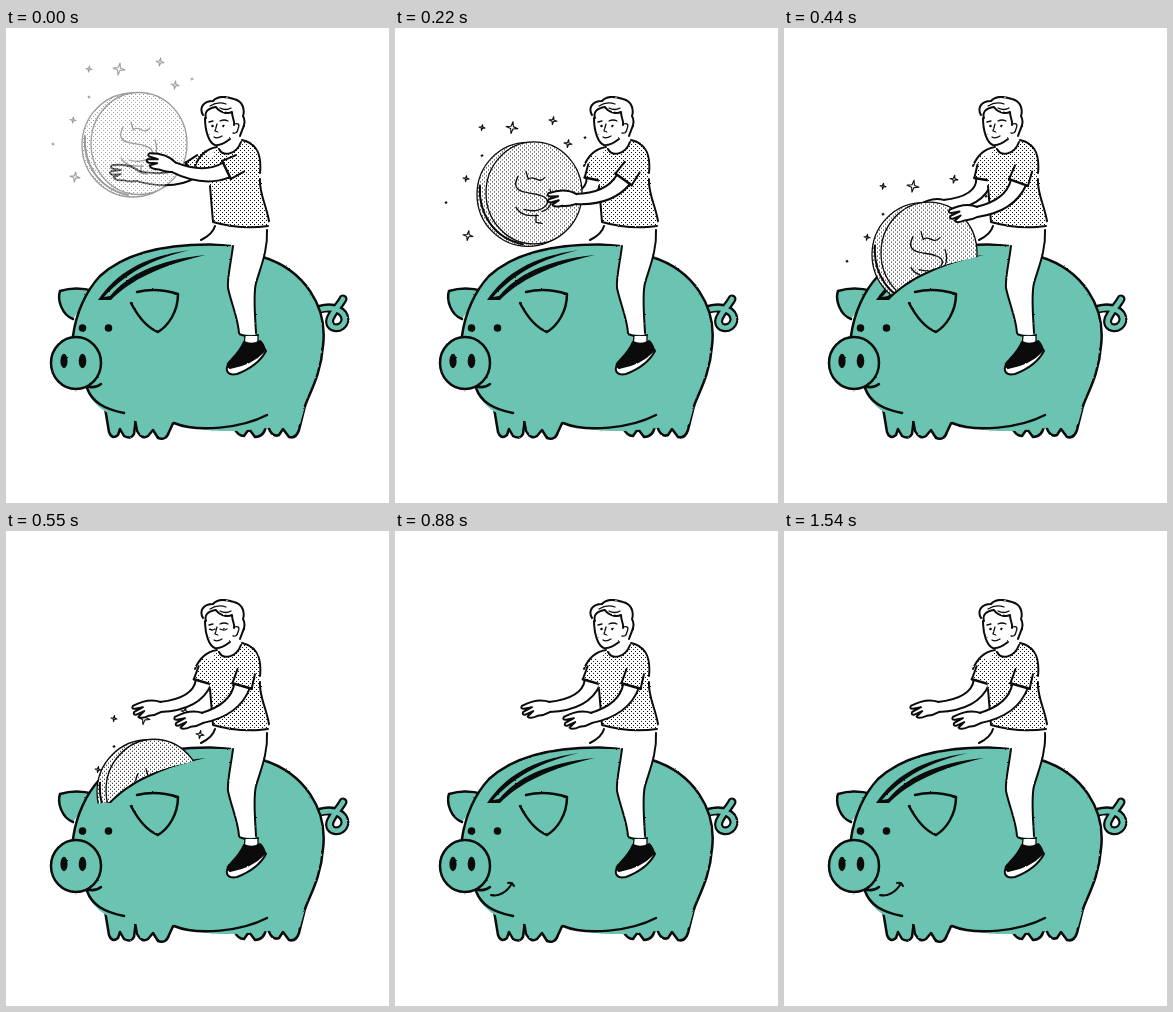
Write an HTML page that moves like this. It is 383 px wide and 475 px high and loops after 1.65 s.

```html
<!DOCTYPE html>
<html lang="en">
<head>
<meta charset="utf-8">
<title>Piggy bank</title>
<style>
  html, body { margin: 0; width: 100%; height: 100%; overflow: hidden; background: #fff; }
  svg { display: block; width: 100%; height: 100%; }
  .ink { fill: none; stroke: #0b0b0b; stroke-width: 2; stroke-linecap: round; stroke-linejoin: round; }
  .bold { stroke-width: 2.5; }
  .thin { stroke-width: 1.3; }
  .green { fill: #6bc4b1; }
  .white { fill: #fff; }
  .black { fill: #0b0b0b; }
  .dots { fill: url(#dots); }
  .plain { stroke: none; }
</style>
</head>
<body>
<svg viewBox="0 0 383 475">
  <defs>
    <pattern id="dots" width="4" height="4" patternUnits="userSpaceOnUse">
      <path class="white" d="M0 0H4V4H0Z"/>
      <path class="black" d="M0 0h1v1h-1zM2 2h1v1h-1z"/>
    </pattern>
    <clipPath id="aboveSlot">
      <path d="M0 0H383V228H200C145 237 122 252 103 271L90 273H0Z"/>
    </clipPath>
    <filter id="rough" filterUnits="userSpaceOnUse" x="0" y="0" width="383" height="475" color-interpolation-filters="sRGB">
      <feTurbulence type="fractalNoise" baseFrequency=".35" numOctaves="1" seed="4"/>
      <feDisplacementMap in="SourceGraphic" scale="2" xChannelSelector="R" yChannelSelector="G"/>
    </filter>
  </defs>

  <g id="sparkles" class="ink white"></g>

  <g class="ink bold" filter="url(#rough)">
    <path stroke-width="9" d="M314 281C328 277 339 283 339 292C337 303 321 302 324 291C327 283 334 277 337 271"/>
    <path stroke="#6bc4b1" stroke-width="4.6" d="M312 282C328 277 339 283 339 292C337 303 321 302 324 291C327 283 334 277 337 271"/>
    <g class="green">
      <path d="M88 263Q70 258 54 263C51 272 56 287 67 291"/>
      <path d="M99 380L103 404Q106 412 112 407L114 401L118 408Q125 412 128 406L130 390"/>
      <path d="M128 386L131 403Q136 412 142 408L147 402L152 410Q160 413 163 404L169 391"/>
      <path d="M228 400Q232 408 238 408L243 401L249 409Q258 409 260 398"/>
      <path d="M261 386C260 400 266 410 273 407L277 401L283 409Q290 411 293 402L299 378"/>
      <path class="plain" d="M67 308C70 285 80 263 94 248C122 222 168 214 224 217L257 229C298 242 322 278 317 318C315 346 304 364 299 378L294 396L262 400L229 403Q190 404 166 394L129 393L100 384C89 377 82 368 81 358Z"/>
    </g>
    <path d="M67 308C70 285 80 263 94 248C122 222 168 214 224 217M257 229C298 242 322 278 317 318C315 346 304 364 299 378M168 395C192 405 236 400 261 387M81 360C86 374 98 381 118 385"/>
    <path class="green" d="M131 264Q150 259 172 266C172 284 162 298 152 304Q137 298 125 275"/>
    <path d="M80 358Q89 361 95 356"/>
    <ellipse class="green" cx="70" cy="335" rx="25" ry="26"/>
    <g class="black plain">
      <ellipse cx="58" cy="333" rx="3.6" ry="7.2"/><ellipse cx="76.5" cy="333" rx="3.8" ry="7.2"/>
      <circle cx="76.5" cy="300" r="3.8"/><circle cx="102.5" cy="300" r="3.8"/>
      <path d="M92 272C110 246 135 229 184 222C145 231 119 246 98 269L104 268C122 247 150 232 200 227C153 238 125 252 105 272Z"/>
    </g>
    <path id="smile" stroke-width="2" d="M96 364C102 366 112 362 117 352M113 352Q117 351 119 355"/>
  </g>

  <path class="white" d="M195 214Q207 207 210 195L236 198L227 217Z"/>
  <g id="farArm" class="ink"></g>

  <g clip-path="url(#aboveSlot)">
    <g id="coin" class="ink thin">
      <ellipse class="dots" cx="-4" cy="1" rx="51" ry="52"/>
      <path d="M-52 -8C-54 20 -38 45 -9 51" stroke-width="2"/>
      <ellipse class="dots" cx="2" cy="-.5" rx="48" ry="51"/>
      <path d="M-14 -17C-24 2 0 -2 8 2C24 6 12 22 -8 16M-6 -22L-4 -15M-4 -14C2 -20 6 -8 13 -16M-16 14C-10 24 0 22 6 22M4 22V29L10 30M18 -4C22 8 18 16 10 18"/>
    </g>
  </g>

  <path class="dots" d="M213 119C205 124 203 140 204 160L207 194Q235 202 263 197C258 175 252 165 254 145C256 125 250 115 236 112C233 125 222 129 213 119Z"/>

  <g class="ink" filter="url(#rough)">
    <path class="white plain" d="M227 217C225 235 221 250 222 260C226 278 232 290 233 306L250 307C249 285 247 267 250 255C255 238 262 222 261 199Q240 202 212 197Z"/>
    <path d="M195 212Q207 206 209 198M227 218C225 235 221 250 222 260C226 278 232 290 233 305M261 202C262 222 255 238 250 255C247 267 249 285 250 305M233 306Q242 310 252 307"/>
    <path class="white thin" d="M239 308L238 318L252 318V308"/>
    <path class="white" d="M223 334C218 343 222 348 231 346Q252 338 260 323L255 314Z"/>
    <path class="black" d="M238 314Q246 318 254 313Q259 318 258 323Q246 336 224 340Q220 338 226 331Q234 323 238 314Z"/>

    <path class="white plain" d="M213 116L214 123Q224 130 234 118L232 105Z"/>
    <path d="M204 158L207 194Q235 202 262 198M236 112C250 115 256 125 254 145M254 151C253 165 260 176 263 193M211 119C199 121 193 128 189 138M213 121C217 129 230 127 235 114"/>

    <path class="white plain" d="M197 88C199 102 202 114 208 117Q216 118 227 109L237 96C241 80 229 68 211 70C197 72 194 80 197 88Z"/>
    <path d="M199 90C199 103 203 115 209 117Q215 118 224 111M197 87C193 80 197 73 207 73C212 67 222 69 228 71C237 73 239 82 237 88C241 95 236 101 234 108M200 90C198 84 202 80 210 79C214 85 222 86 226 84C226 90 229 93 228 97"/>
    <path class="thin" d="M228 96Q235 94 232 101Q231 106 227 105M203 94L207 93M214 93Q218 91 222 93M211 96L209 103L212 104M208 109Q211 111 216 108M204 78Q212 73 220 76M214 80Q220 83 225 80"/>
    <g id="eyesOpen" class="black plain"><circle cx="206.5" cy="98" r="1.3"/><circle cx="217.5" cy="98" r="1.3"/></g>
    <path id="eyesShut" class="thin" d="M204 98Q206 100 209 98M214 98Q218 100 221 98"/>
  </g>
  <g id="nearArm" class="ink"></g>
</svg>

<script>
const $ = id => document.getElementById(id);
const STEP = 110, LOOP = 1650, HOLD_STEP = 8, HOLD_END = 1430;

const arms = {
  farArm: { shoulder: [204, 129], upper: 46, fore: 37 },
  nearArm: { shoulder: [243, 131], upper: 50, fore: 34 }
};

// Wrist x, y and hand tilt in degrees, at key steps
const lift = { farArm: [131, 148, 17], nearArm: [167, 139, 24] };
const hold = { farArm: [158, 172, 10], nearArm: [180, 171, 6] };
const lower = { farArm: [165, 178, -15], nearArm: [189, 181, 0] };
const rest = { farArm: [154, 176, -4], nearArm: [196, 187, -4] };
const dip = { farArm: [157, 187, -10], nearArm: [197, 190, -36] };
const keys = [[0, lift], [2, hold], [3, lower], [5, rest], [8, rest], [9, dip], [10, rest]];

const HAND = 'M1 -5C-8 -9 -16 -8 -27 -3Q-29 0 -25 0L-17 -1L-26 3Q-28 6 -24 6L-16 3L-22 8Q-20 11 -12 8C-6 8 -3 7 1 5';

// x, y, radius
const stars = [
  [83, 41, 3], [113, 41, 6], [154, 34, 4], [169, 57, 4], [186, 51, 1],
  [83, 69, 1], [67, 92, 3], [47, 116, 1], [69, 149, 5]
];
$('sparkles').innerHTML = stars.map(([x, y, r]) => {
  const k = r * .2;
  return `<path style="stroke-width:1.1" transform="translate(${x} ${y}) rotate(10)"
    d="M0 ${-r}L${k} ${-k}L${r} 0L${k} ${k}L0 ${r}L${-k} ${k}L${-r} 0L${-k} ${-k}Z"/>`;
}).join('');

const mix = (a, b, u) => a.map((v, i) => v + (b[i] - v) * u);

function poseAt(n, name) {
  const next = Math.max(1, keys.findIndex(([at]) => at >= n));
  const [[from, a], [to, b]] = [keys[next - 1], keys[next]];
  return mix(a[name], b[name], (n - from) / (to - from));
}

// Two-bone joint: the elbow always hangs below the line from shoulder to wrist
function elbowOf({ shoulder: [sx, sy], upper, fore }, x, y) {
  const d = Math.hypot(x - sx, y - sy);
  const ux = (x - sx) / d, uy = (y - sy) / d;
  const along = (upper ** 2 - fore ** 2 + d * d) / (2 * d);
  const out = Math.sqrt(Math.max(0, upper ** 2 - along ** 2));
  return [sx + ux * along + uy * out, sy + uy * along - ux * out];
}

// The two points at a distance w on either side of p, across the direction from a to b
function sides(p, a, b, w) {
  const d = Math.hypot(b[0] - a[0], b[1] - a[1]);
  const nx = (a[1] - b[1]) / d * w, ny = (b[0] - a[0]) / d * w;
  return [[p[0] + nx, p[1] + ny], [p[0] - nx, p[1] - ny]];
}

function drawArm(name, n) {
  const arm = arms[name], { shoulder } = arm;
  const [x, y, tilt] = poseAt(n, name);
  const wrist = [x, y], elbow = elbowOf(arm, x, y), cuff = mix(shoulder, elbow, .5);
  const [a, p] = sides(cuff, shoulder, elbow, 8);
  const [b, q] = sides(elbow, cuff, wrist, 7);
  const [c, r] = sides(wrist, elbow, wrist, 5);
  const [top, under] = sides(shoulder, shoulder, elbow, 8.5);
  const [cuffTop, cuffUnder] = sides(cuff, shoulder, elbow, 10);
  $(name).innerHTML = `
    <path class="white plain" d="M${a}Q${b} ${c}L${r}Q${q} ${p}Z"/>
    <path d="M${a}Q${b} ${c}M${r}Q${q} ${p}"/>
    <path class="white" d="${HAND}" transform="translate(${x} ${y}) rotate(${tilt})"/>
    <path class="dots plain" d="M${top}L${cuffTop}L${cuffUnder}L${under}Z"/>
    <path d="M${mix(top, cuffTop, .4)}L${cuffTop}M${cuffUnder}L${mix(under, cuffUnder, .4)}"/>
    <path class="bold" d="M${cuffTop}L${cuffUnder}"/>`;
}

const show = (id, on) => $(id).style.display = on ? '' : 'none';

function place(id, x, y, alpha) {
  $(id).setAttribute('transform', `translate(${x} ${y})`);
  $(id).setAttribute('opacity', alpha);
}

function draw(n) {
  const alpha = Math.min(1, .4 + n * .4), falling = n < 7;
  place('coin', 131 + 3 * n, 116 + 22 * n + 1.35 * n * n, alpha);
  place('sparkles', n * n, 29.3 * n, alpha);
  Object.keys(arms).forEach(name => drawArm(name, n));
  const shut = n === 5 || n === 6;
  show('coin', falling);
  show('sparkles', falling);
  show('smile', !falling);
  show('eyesShut', shut);
  show('eyesOpen', !shut);
}

function stepAt(t) {
  return t < HOLD_END
    ? Math.min(HOLD_STEP, Math.floor(t / STEP))
    : HOLD_STEP + 1 + Math.floor((t - HOLD_END) / STEP);
}

const start = performance.now();
let current = -1;
function tick() {
  const n = stepAt((performance.now() - start) % LOOP);
  if (n !== current) draw(current = n);
  requestAnimationFrame(tick);
}
tick();
</script>
</body>
</html>
```
